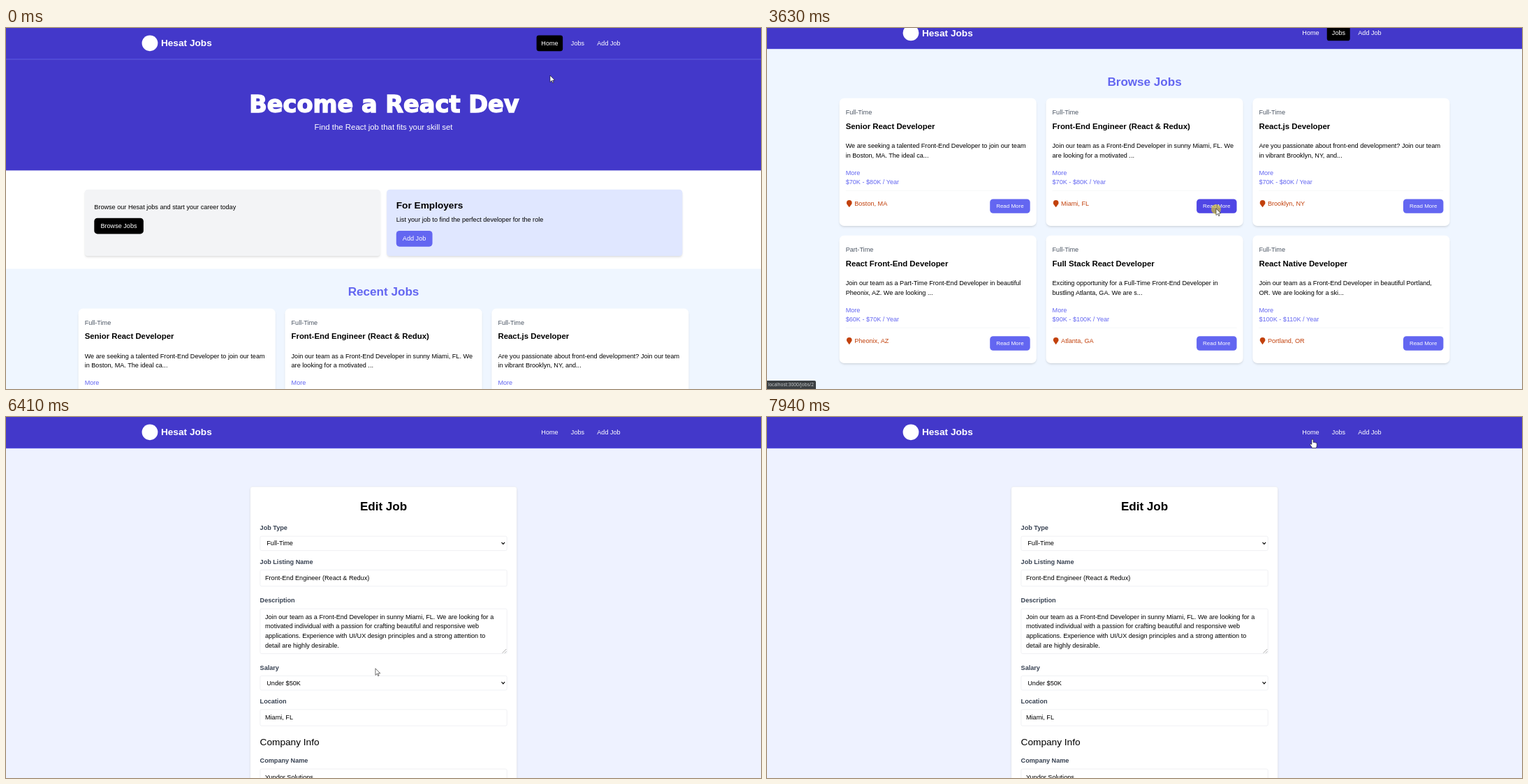
An HTML page that plays this animation: 1081x518 px, repeating every 8 s.

```html
<!DOCTYPE html>
<html lang="en">
<head>
<meta charset="utf-8">
<title>Job board walkthrough</title>
<style>
* { box-sizing: border-box; margin: 0; }
html, body { width: 100%; height: 100%; overflow: hidden; background: #fff; }
#stage { position: relative; width: 1081px; height: 518px; overflow: hidden; }
#view { position: absolute; left: 0; top: -.6px; width: 1900px; transform: scale(.569); transform-origin: 0 0;
  font: 16px/24px "Liberation Sans", Arial, sans-serif; color: #000; white-space: pre; }
.page { position: absolute; left: 0; top: 0; width: 1900px; min-height: 1600px; background: #eef2ff; }
#home { background: #fff; }
.bar { background: #4338ca; height: 81px; border-bottom: 1px solid #6366f1; color: #fff; box-shadow: 0 -9px #4338ca; }
.bar > div { display: flex; align-items: center; width: 1216px; height: 80px; margin: auto; }
.logo { width: 40px; height: 40px; border-radius: 50%; background: #fff; margin-right: 8px; }
.bar b { font-size: 24px; margin-right: auto; }
.bar a { padding: 8px 12px; border-radius: 6px; margin-left: 8px; }
.bar a.on { background: #000; }
.bar a.over { background: #111827; }
.card { background: #fff; border-radius: 8px; box-shadow: 0 4px 6px -1px #0000001a, 0 2px 4px -2px #0000001a; padding: 24px; }
.btn { display: block; width: fit-content; padding: 8px 16px; border-radius: 8px; background: #6366f1; color: #fff; }
.btn.over { background: #4f46e5; }
.pill { width: 100%; border-radius: 20px; text-align: center; font-weight: bold; }
.head { font-size: 30px; line-height: 36px; font-weight: bold; text-align: center; margin-bottom: 24px; }
.xl { font-size: 20px; line-height: 28px; }
.xxl { font-size: 24px; line-height: 32px; }
.link { color: #6366f1; }
svg { display: block; overflow: visible; }

.hero { height: 280px; padding-top: 80px; background: #4338ca; color: #fff; text-align: center; }
.hero h1 { position: relative; left: 1.5px; top: 3px; font: bold 59px/60px "DejaVu Sans", sans-serif; -webkit-text-stroke: 2.5px #fff; }
.hero p { margin-top: 16px; }
.duo { display: flex; gap: 16px; width: 1504px; margin: 48px auto 32px; }
.duo .card { width: 744px; height: 168px; }
.duo p { margin: 8px 0 16px; }
.list { background: #eff6ff; padding-top: 40px; min-height: 900px; }
.grid { display: grid; grid-template-columns: repeat(3, 496px); gap: 24px; width: 1536px; margin: auto; }
.job { height: 322px; padding: 16px; border-radius: 12px; }
.job .type { margin: 8px 0; color: #4b5563; }
.job h3 { margin-bottom: 24px; }
.job .text { margin-bottom: 20px; }
.job hr { border: 1px solid #f3f4f6; margin: 8px 0 20px; }
.row { display: flex; justify-content: space-between; }
.place { display: flex; align-items: center; gap: 4px; height: 24px; color: #c2410c; }
.row .btn { height: 36px; font-size: 14px; line-height: 20px; }

.back { background: #fff; height: 72px; padding: 24px 206px; display: flex; align-items: center; gap: 8px; }
.cols { display: flex; gap: 24px; padding: 40px 206px; align-items: flex-start; }
.main { width: 1041.6px; flex: none; }
.side { width: 416.6px; flex: none; }
.cols .card { margin-bottom: 24px; }
.cols .sub { font-size: 18px; line-height: 28px; color: #3730a3; }
.cols hr { border: 0; border-top: 1px solid #e5e7eb; margin: 16px 0; }
.chip { background: #e0e7ff; padding: 8px; margin: 8px 0; font-weight: bold; }

.form { width: 672px; height: 1192px; margin: 96px auto 0; padding: 32px 24px; border: 1px solid #e5e7eb; border-radius: 6px; }
.form label { display: block; font-weight: bold; color: #374151; margin-bottom: 8px; }
.field { position: relative; border: 1px solid #e5e7eb; border-radius: 4px; padding: 8px 12px; }
.field.pick { padding: 5.5px 16px; }
.field svg { position: absolute; fill: none; }

#status { position: absolute; left: 0; bottom: 0; height: 12px; padding: 0 3px 0 1.5px; background: #3c4043; color: #d0d3d6;
  border-radius: 0 2px 0 0; font: 6.55px/12px "Open Sans", sans-serif; }
#ring { position: absolute; width: 14px; height: 14px; margin: -7px; border-radius: 50%; background: #e2d21f; opacity: .62; }
#mouse { position: absolute; left: 0; top: 0; }
</style>
</head>
<body>
<div id="stage">
  <div id="view"></div>
  <div id="status"></div>
  <div id="ring"></div>
  <svg id="mouse" width="1" height="1" fill="#fff" stroke="#000" stroke-linejoin="round">
    <path id="arrow" transform="scale(.569)" d="M0 0V17L4 13.2L6.6 19L9 18L6.5 12.3H12Z"/>
    <path id="hand" transform="scale(.569)" d="M-2 13V2Q-2 0 0 0T2 2V8Q3 6.5 5 8Q7 7 8 9Q11 8.5 11 11V16Q11 19 9 22H-1Q-2 19-5 15Q-7 12-5.5 11.5Q-4 11-2 13Z"/>
  </svg>
</div>
<script>
const $ = id => document.getElementById(id);
const company = 'Yundor Solutions', email = 'contact@yundormast.com', phone = '202-555-0143';
const engineer = 'Front-End Engineer (React &amp; Redux)';

const bar = (active, id = '') => `<div class="bar"><div><i class="logo"></i><b>Hesat Jobs</b>` +
  ['Home', 'Jobs', 'Add Job'].map(n => `<a class="${n == active ? 'on' : ''}"${n == 'Jobs' && id ? ` id="${id}"` : ''}>${n}</a>`).join('') +
  '</div></div>';

const pin = (size, color) => `<svg width="${size}" height="${size}" viewBox="-2 0 16 16" fill="${color}">` +
  '<path d="M6 16C1 9 0 8.5 0 6a6 6 0 0 1 12 0C12 8.5 11 9 6 16Z"/></svg>';

const jobs = [
  ['Full', 'Senior React Developer', 'We are seeking a talented Front-End Developer to join our team\nin Boston, MA. The ideal ca...', '$70K - $80K', 'Boston, MA'],
  ['Full', engineer, 'Join our team as a Front-End Developer in sunny Miami, FL. We\nare looking for a motivated ...', '$70K - $80K', 'Miami, FL'],
  ['Full', 'React.js Developer', 'Are you passionate about front-end development? Join our team\nin vibrant Brooklyn, NY, and...', '$70K - $80K', 'Brooklyn, NY'],
  ['Part', 'React Front-End Developer', 'Join our team as a Part-Time Front-End Developer in beautiful\nPheonix, AZ. We are looking ...', '$60K - $70K', 'Pheonix, AZ'],
  ['Full', 'Full Stack React Developer', 'Exciting opportunity for a Full-Time Front-End Developer in\nbustling Atlanta, GA. We are s...', '$90K - $100K', 'Atlanta, GA'],
  ['Full', 'React Native Developer', 'Join our team as a Front-End Developer in beautiful Portland,\nOR. We are looking for a ski...', '$100K - $110K', 'Portland, OR']
];
const grid = (list, prefix) => '<div class="grid">' + list.map(([type, title, text, pay, place], i) =>
  `<div class="card job"><p class="type">${type}-Time</p><h3 class="xl">${title}</h3><p class="text">${text}</p>` +
  `<p class="link">More</p><p class="link">${pay} / Year</p><hr><div class="row"><span class="place">${pin(18, '#c2410c')}${place}</span>` +
  `<a class="btn" id="${prefix + i}">Read More</a></div></div>`).join('') + '</div>';

const field = (label, text, height, gap, kind = '') => `<label>${label}</label>` +
  `<div class="field ${kind}" style="height:${height}px;margin-bottom:${gap}px">${text}` +
  (kind == 'pick' ? '<svg width="10" height="6" style="right:4px;top:15px" stroke="#000" stroke-width="2"><path d="M1 0L5 4.5L9 0"/></svg>' : '') +
  (kind == 'area' ? '<svg width="10" height="10" style="right:1px;bottom:1px" stroke="#666"><path d="M0 10L10 0M6 10L10 6"/></svg>' : '') + '</div>';

const pages = {
  home: bar('Home', 'jobsLink') +
    '<div class="hero"><h1>Become a React Dev</h1><p class="xl">Find the React job that fits your skill set</p></div>' +
    '<div class="duo"><div class="card" style="background:#f3f4f6"><p>Browse our Hesat jobs and start your career today</p><a class="btn" style="background:#000">Browse Jobs</a></div>' +
    '<div class="card" style="background:#e0e7ff"><h2 class="xxl">For Employers</h2><p>List your job to find the perfect developer for the role</p><a class="btn">Add Job</a></div></div>' +
    `<div class="list"><h2 class="head link">Recent Jobs</h2>${grid(jobs.slice(0, 3), 'recent')}</div>`,
  jobs: bar('Jobs') +
    `<div class="list" style="padding-top:64px;min-height:1519px"><h2 class="head link">Browse Jobs</h2>${grid(jobs, 'more')}</div>`,
  job: bar('Jobs') +
    '<div class="back link"><svg width="16" height="16" fill="none" stroke="#6366f1" stroke-width="2.2"><path d="M15 8H2.5M8 2L2 8L8 14"/></svg>Back to Job Listings</div>' +
    '<div class="cols"><div class="main"><div class="card" style="height:180px"><p style="color:#6b7280;margin-bottom:16px">Full-Time</p>' +
    `<h1 class="head" style="text-align:left;margin-bottom:16px">${engineer}</h1>` +
    `<p class="place" style="gap:0;align-items:flex-start">${pin(16, '#6b7280')}Miami, FL</p></div>` +
    '<div class="card" style="height:240px"><h3 class="sub" style="margin-bottom:24px">Job Description</h3>' +
    '<p style="margin-bottom:16px">Join our team as a Front-End Developer in sunny Miami, FL. We are looking for a motivated individual with a passion for crafting beautiful\n' +
    'and responsive web applications. Experience with UI/UX design principles and a strong attention to detail are highly desirable.</p>' +
    '<h3 class="sub" style="margin-bottom:8px">Salary</h3><p>$70K - $80K / Year</p></div></div>' +
    '<div class="side"><div class="card" style="height:461px"><h3 class="xl" style="margin-bottom:24px">Company Info</h3>' +
    `<p class="xxl" style="margin-bottom:8px">${company}</p><p>${company} is a creative agency specializing\n` +
    'in digital design and development. Our team is\ndedicated to pushing the boundaries of creativity\nand innovation to deliver exceptional results for our\nclients.</p><hr>' +
    `<p class="xl">Contact Email:</p><p class="chip">${email}</p><p class="xl">Contact Phone:</p><p class="chip">${phone}</p></div>` +
    '<div class="card" style="height:196px"><h3 class="xl" style="margin-bottom:24px">Manage Job</h3><a class="btn pill" id="editBtn">Edit Job</a>' +
    '<a class="btn pill" style="background:#ef4444;margin-top:16px">Delete Job</a></div></div></div>',
  edit: bar('') + '<div class="card form"><h2 class="head">Edit Job</h2>' +
    field('Job Type', 'Full-Time', 37, 16, 'pick') +
    field('Job Listing Name', engineer, 42, 24) +
    field('Description', 'Join our team as a Front-End Developer in sunny Miami, FL. We are looking for a\nmotivated individual with a passion for crafting beautiful and responsive web\n' +
      'applications. Experience with UI/UX design principles and a strong attention to\ndetail are highly desirable.', 114, 23, 'area') +
    field('Salary', 'Under $50K', 37, 16, 'pick') +
    field('Location', 'Miami, FL', 42, 24) +
    '<p class="xxl" style="margin-bottom:20px">Company Info</p>' +
    field('Company Name', company, 42, 16) +
    field('Company Description', company + ' is a creative agency specializing in digital design and\ndevelopment. Our team is dedicated to pushing the boundaries of creativity and\n' +
      'innovation to deliver exceptional results for our clients.', 114, 23, 'area') +
    field('Contact Email', email, 42, 16) +
    field('Contact Phone', phone, 42, 16) +
    '<a class="btn pill">Update Job</a></div>'
};
$('view').innerHTML = Object.entries(pages).map(([id, html]) => `<div class="page" id="${id}">${html}</div>`).join('');

// Keyframes: [time, ...values]
const pointer = [
  [0, 779, 68], [100, 779, 68], [420, 571, 247], [470, 569, 244], [780, 569, 244], [1340, 850, 74], [1430, 841, 66],
  [1600, 825, 26], [1910, 824, 25], [1980, 824, 25], [2520, 734, 295], [2700, 734, 295], [3480, 643, 259], [3700, 643, 259],
  [4060, 647, 318], [4200, 649, 322], [4390, 649, 322], [5200, 816, 445], [5790, 816, 445], [6500, 516, 357], [7100, 516, 357],
  [7850, 781, 32], [8000, 781, 32]
];
const scroll = [
  [0, 0], [2700, 0], [2950, 26], [3699, 26], [3700, 4], [4600, 4], [4700, 0],
  [6540, 0], [6820, 493], [7100, 493], [7560, 0], [8000, 0]
];
function at(keys, t) {
  const i = keys.findIndex(k => k[0] > t), a = keys[i - 1], b = keys[i];
  const p = (t - a[0]) / (b[0] - a[0]), e = p * p * (3 - 2 * p);
  return a.slice(1).map((v, n) => v + (b[n + 1] - v) * e);
}
const show = (id, on) => $(id).style.display = on ? '' : 'none';
const hover = (id, on) => $(id).classList.toggle('over', on);

function draw(t) {
  const within = (a, b) => t >= a && t < b;
  const page = t < 1980 ? 'home' : t < 3700 ? 'jobs' : t < 5790 ? 'job' : 'edit';
  for (const id in pages) show(id, id == page);
  $(page).style.transform = `translateY(${-at(scroll, t)[0]}px)`;

  hover('jobsLink', t >= 1550);
  hover('more1', t >= 3410);
  hover('editBtn', t >= 5240);
  show('status', within(1700, 1980) || within(3450, 3700));
  $('status').textContent = 'localhost:3000/jobs' + (page == 'jobs' ? '/2' : '');

  const [x, y] = at(pointer, t);
  const hand = within(1550, 1980) || within(5200, 5790) || t >= 7800;
  show('hand', hand);
  show('arrow', !hand);
  $('mouse').style.transform = `translate(${x}px,${y}px)`;
  show('ring', within(1840, 1980) || within(3560, 3700) || within(5720, 5790));
  $('ring').style.transform = `translate(${x}px,${y + 1}px)`;
}
function loop(now) {
  draw(now % 8000);
  requestAnimationFrame(loop);
}
draw(0);
requestAnimationFrame(loop);
</script>
</body>
</html>
```
